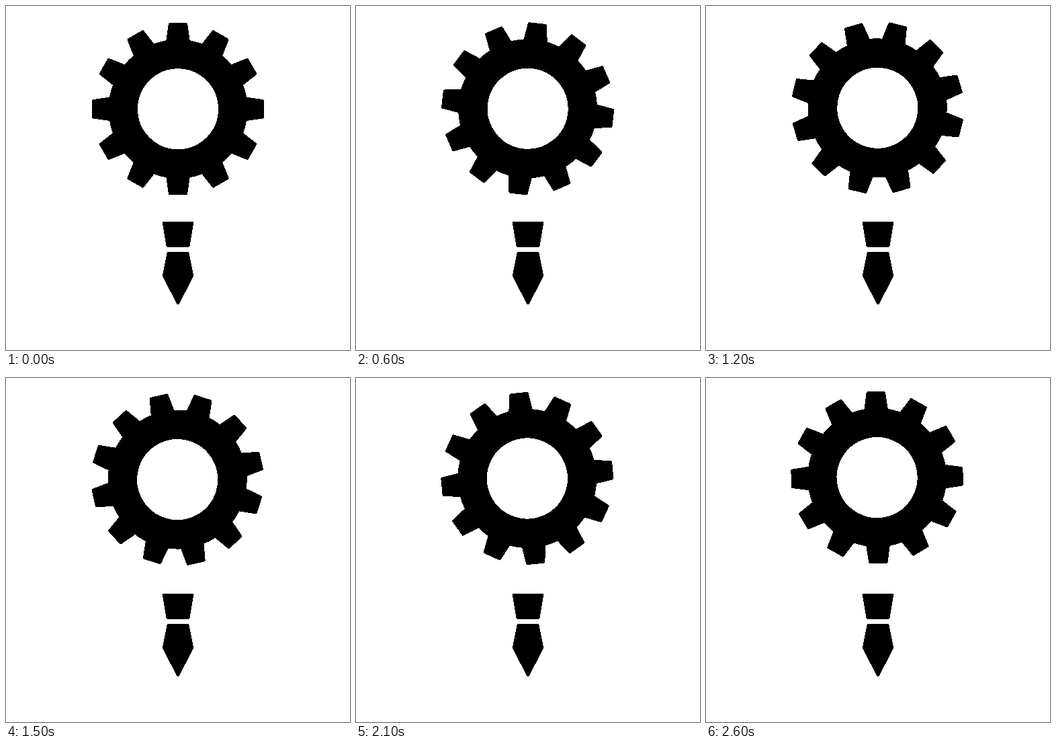
Recreate the animation shown at these times as an HTML page. Size 512 px wide and 512 px high, loop 2.7 s.

```html
<!DOCTYPE html>
<html lang="en">
<head>
<meta charset="utf-8">
<title>Gear</title>
<style>
  html, body { margin: 0; height: 100%; overflow: hidden; background: #fff; }
  svg { display: block; width: 100vw; height: 100vh; shape-rendering: crispEdges; }
  polygon { stroke: #000; stroke-width: 4; stroke-linejoin: round; }
</style>
</head>
<body>
<svg viewBox="0 0 512 512">
  <g id="gear">
    <circle r="81.75" fill="none" stroke="#000" stroke-width="43.5"/>
  </g>
  <polygon points="234.8,322.6 277.2,322.6 271.5,356.8 240.5,356.8"/>
  <polygon points="241.5,367.8 270.5,367.8 277.2,401.5 256,442.4 234.8,401.5"/>
</svg>
<script>
const gear = document.getElementById('gear');
for (let a = 0; a < 360; a += 30) {
  gear.insertAdjacentHTML('beforeend',
    `<polygon points="-12.2,-126 12.2,-126 16.2,-98 -16.2,-98" transform="rotate(${a})"/>`);
}

const LOOP = 2700, LAST = 17;

function draw(now) {
  const t = now % LOOP;
  // steps last 200 ms and 100 ms in turn
  const step = 2 * Math.floor(t / 300) + (t % 300 >= 200 ? 1 : 0);
  const u = step / LAST;
  // turn by almost one tooth with a slight ease, while drifting up and left
  const angle = 29.2 * u - 0.4 * Math.sin(2 * Math.PI * u);
  const x = 256 - 1.4 * u;
  const y = 153.3 - 5.2 * u ** 1.6;
  gear.setAttribute('transform', `translate(${x} ${y}) rotate(${angle})`);
}

const start = performance.now();
function tick() {
  draw(performance.now() - start);
  requestAnimationFrame(tick);
}
tick();
</script>
</body>
</html>
```
